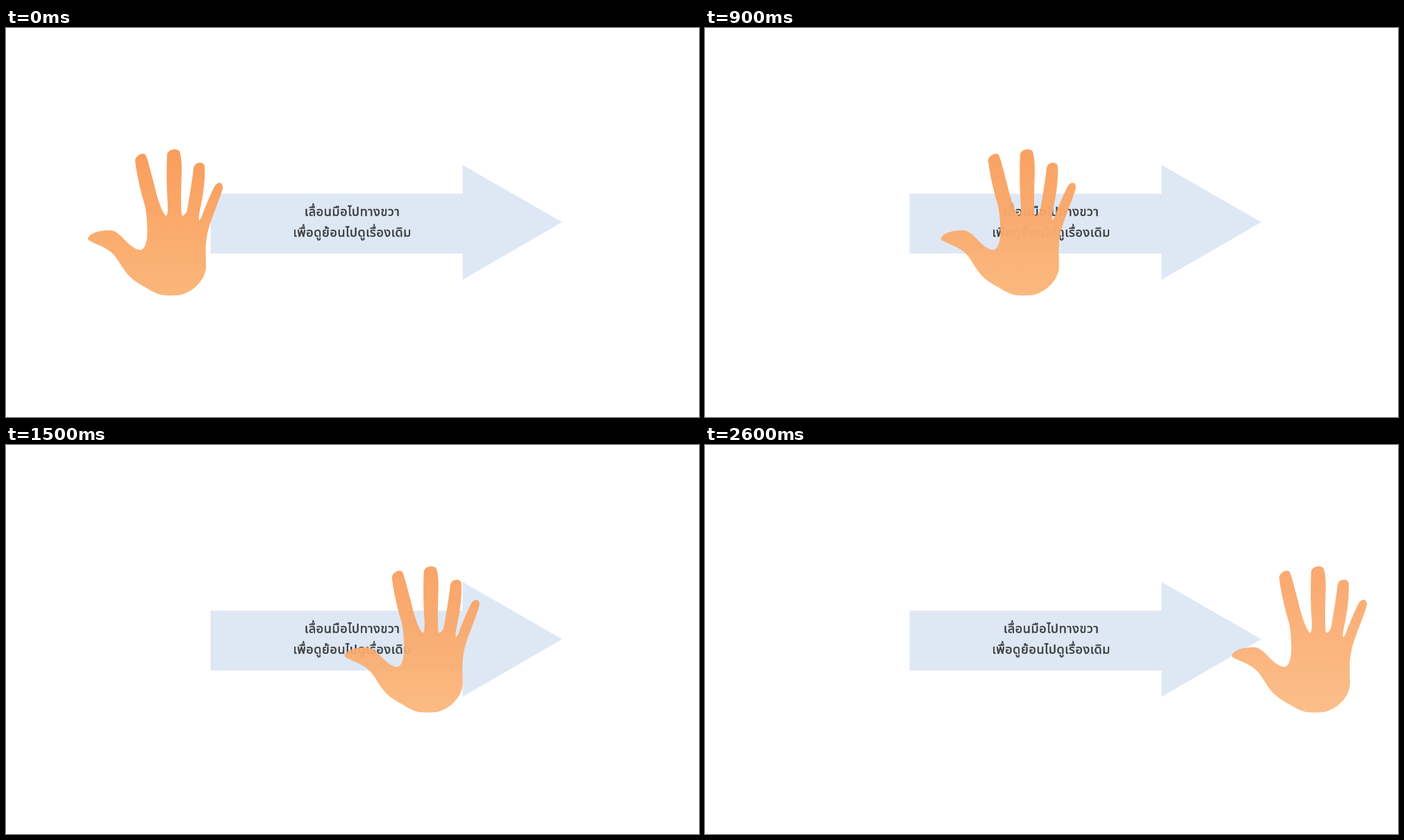
An HTML page that plays this animation: 998x561 px, repeating every 2700 ms.

```html
<!DOCTYPE html>
<html lang="th">
<head>
<meta charset="utf-8">
<style>
  html, body { margin: 0; width: 100%; height: 100%; overflow: hidden; background: #fff; }
  svg { display: block; width: 998px; height: 561px; }
  text {
    font: 18px "Noto Sans Thai Looped", "Noto Sans Thai", "Noto Sans", sans-serif;
    letter-spacing: 0.65px;
    fill: #3a3a3c;
    stroke: #3a3a3c;
    stroke-width: 0.5px;
    text-anchor: middle;
  }
</style>
</head>
<body>
<svg viewBox="0 0 998 561">
  <defs>
    <linearGradient id="skin" x1="0" y1="0" x2="0" y2="1">
      <stop offset="0" stop-color="#f99d5c"/>
      <stop offset="1" stop-color="#fbb67a"/>
    </linearGradient>
  </defs>
  <path fill="#dee8f5" d="M294.6 239H657.5V197.5L801 280 657.5 363V325.2H294.6Z"/>
  <text x="498.8" y="271">เลื่อนมือไปทางขวา</text>
  <text x="498.8" y="301">เพื่อดูย้อนไปดูเรื่องเดิม</text>
  <path id="hand" fill="url(#skin)" d="M118 303
    C122 294 140 291 152 292C166 294 176 318 193 320
    C201 320 204 305 203.5 290C203 270 201 258 198 249
    C192 228 187 203 186 191C186 185 196 179 200 182
    C203 183 209 210 213 224C217 242 223 263 230 271
    C233 271 233 264 233 255C231 225 231 205 232 182
    C234 174 247 173 250 178C254 190 253 205 252.5 225
    C252 245 252 258 253 270C256 273 260 266 261 262
    C263 250 267.5 225 270 203C271 192 285 192 286 199
    C287 215 285 235 281 254C279 264 277 273 278 277
    C281 278 284 264 288 256C292 246 297 235 300 229
    C304 221 313 221 312 231C310 242 297 270 291 292
    C286 313 288 328 288 345C287 363 270 381 250 385.3
    C240 386 230 386 224 385C212 382 205 376 197 372
    C187 366 181 362 175 355C165 343 160 330 151 323
    C140 314 127 311 121 307C118 306 118 305 118 303Z"/>
</svg>
<script>
  const LOOP = 2700, STEP = 100, STEP_X = 24.65, STEP_FADE = 0.0045;
  const hand = document.getElementById("hand");

  function draw(now) {
    const step = Math.floor((now % LOOP) / STEP);
    hand.setAttribute("transform", `translate(${step * STEP_X} 0)`);
    hand.setAttribute("opacity", 1 - step * STEP_FADE);
  }

  const start = performance.now();
  function tick() {
    draw(performance.now() - start);
    requestAnimationFrame(tick);
  }
  tick();
</script>
</body>
</html>
```
